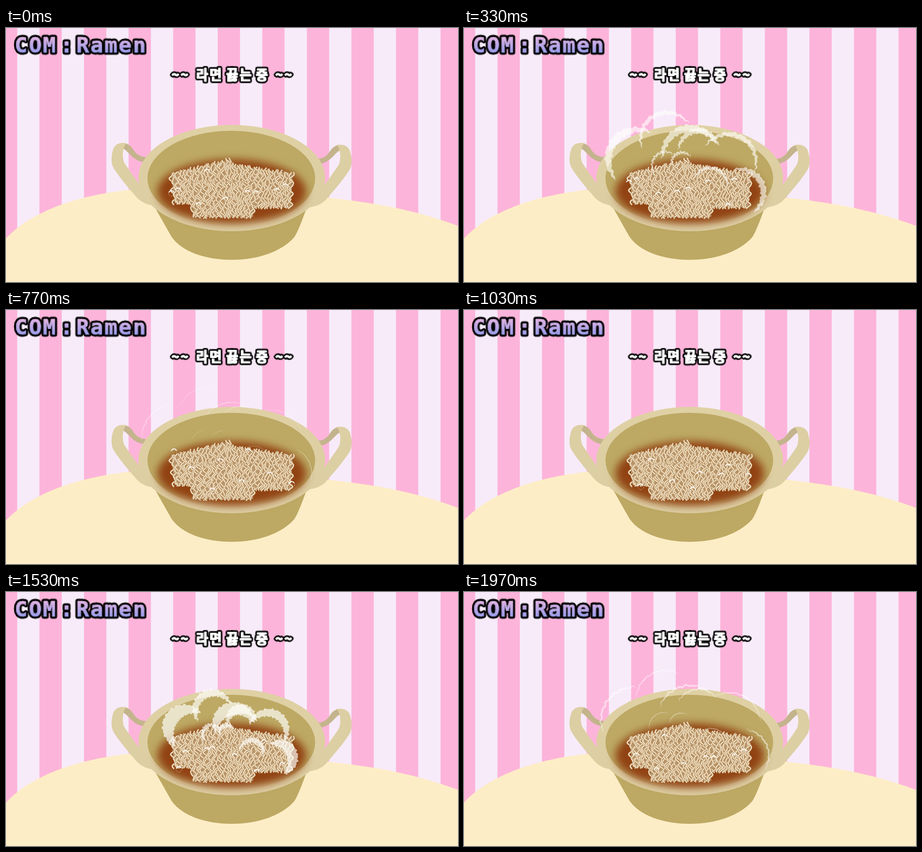
Recreate the animation shown at these times as an HTML page with a canvas. Size 997 by 561 pixels, loop 2010 ms.

```html
<!DOCTYPE html>
<html lang="ko">
<head>
<meta charset="utf-8">
<style>
html, body { margin: 0; width: 100%; height: 100%; overflow: hidden; }
canvas { display: block; }
</style>
</head>
<body>
<canvas id="stage" width="997" height="561"></canvas>
<script>
const W = 997, H = 561, LOOP = 2010, STEAM = 1375, TAU = Math.PI * 2, RAD = Math.PI / 180;
const OLIVE = '#bda964', RIM = '#dccda2';
const ctx = document.getElementById('stage').getContext('2d');

let seed = 7;
const rnd = () => (seed = seed * 16807 % 2147483647) / 2147483647;
const mix = (a, b, k) => a + (b - a) * k;

function layer(w, h) {
  const c = document.createElement('canvas');
  c.width = w;
  c.height = h;
  return c;
}

function fillPath(g, color, d) {
  g.fillStyle = color;
  g.fill(new Path2D(d));
}

function ellipse(g, color, x, y, rx, ry) {
  g.fillStyle = color;
  g.beginPath();
  g.ellipse(x, y, rx, ry, 0, 0, TAU);
  g.fill();
}

function fade(g, y0, color0, y1, color1) {
  const grad = g.createLinearGradient(0, y0, 0, y1);
  grad.addColorStop(0, color0);
  grad.addColorStop(1, color1);
  return grad;
}

function drawHandle(g) {
  fillPath(g, '#c4b48d', 'M256 254 Q271 254 279 266 Q290 285 309 285 L302 296 Q287 294 273 279 Q262 267 256 265Z');
  fillPath(g, '#dccfa3', 'M268 255 Q245 250 237 266 Q229 290 236 307 C247 327 277 361 290 376 ' +
    'Q303 389 325 392 L330 365 L297 350 C282 327 268 310 260 296 Q254 275 263 257Z');
}

// A slab of wavy strands, its top edge sloping from y0 to y1
function drawNoodles(g, x0, y0, x1, y1, bottom) {
  fillPath(g, '#b9956a', `M${x0} ${y0}L${x1} ${y1}L${x1 - 4} ${bottom}L${x0 + 8} ${bottom}Z`);
  g.lineCap = g.lineJoin = 'round';
  const count = Math.round((x1 - x0) / 3.8);
  for (let i = 0; i <= count; i++) {
    const u = i / count, phase = rnd() * 4, freq = .2 + rnd() * .12, amp = 2.5 + rnd() * 2;
    const top = mix(y0, y1, u) - rnd() * 4, end = bottom + rnd() * 4;
    g.beginPath();
    for (let y = top; y <= end; y += 1.5) {
      const lean = mix(8, -6, u) * (y - top) / (end - top);
      g.lineTo(mix(x0, x1, u) + lean + amp * Math.sin(y * freq + phase) + Math.sin(y * .5 + phase), y);
    }
    for (const [color, width] of [['#a57f52', 3.8], ['#e2c9a2', 2.7], ['#f8ebd3', 1.3]]) {
      g.strokeStyle = color;
      g.lineWidth = width;
      g.stroke();
    }
  }
}

// Words drawn at half size and doubled, for blocky edges
function pixelText(g, words, font, y, color, outline, weight) {
  const c = layer(W / 2 | 0, 64), t = c.getContext('2d');
  t.scale(.5, .5);
  t.font = font;
  t.letterSpacing = '3px';
  t.textAlign = 'center';
  t.lineJoin = 'round';
  t.fillStyle = color;
  for (const [stroke, width] of [['#000', outline], [color, weight]]) {
    t.strokeStyle = stroke;
    t.lineWidth = width;
    for (const [word, x] of words) t.strokeText(word, x, y);
  }
  for (const [word, x] of words) t.fillText(word, x, y);
  g.imageSmoothingEnabled = false;
  g.drawImage(c, 0, 0, c.width * 2, c.height * 2);
}

function drawScene(g) {
  g.fillStyle = '#f7ebfa';
  g.fillRect(0, 0, W, H);
  g.fillStyle = '#fdb4da';
  for (let x = -24.5; x < W; x += 98.3) g.fillRect(x, 0, 49.2, H);
  fillPath(g, '#fdedc6', 'M0 465 C60 400 170 368 275 357 C430 335 600 352 720 376 C850 390 930 412 997 437 V561 H0Z');

  fillPath(g, OLIVE, 'M326 392 L365 461 C388 494 440 512 497 512 C556 512 607 494 635 463 Q644 452 665 392Z');
  drawHandle(g);
  g.save();
  g.translate(995, 4);
  g.scale(-1, 1);
  drawHandle(g);
  g.restore();

  ellipse(g, fade(g, 214, '#dfd1a4', 449, RIM), 498, 331.5, 206, 117.5);
  ellipse(g, fade(g, 390, OLIVE, 438, RIM), 497, 332, 185, 105);
  g.filter = 'blur(9px)';
  ellipse(g, '#914213', 498, 361, 164, 71);
  g.filter = 'none';

  drawNoodles(g, 364, 323, 493, 291, 387);
  drawNoodles(g, 489, 301, 632, 322, 396);
  drawNoodles(g, 405, 343, 549, 342, 417);

  pixelText(g, [['COM', 66], [':', 135], ['Ramen', 233]], 'bold 47px "DejaVu Sans Mono", monospace',
    54, fade(g, 18, '#e5b4e2', 56, '#969ceb'), 10, 1);
  pixelText(g, [['~~', 385], ['라면', 449], ['끓는', 515], ['중', 566], ['~~', 614]],
    '900 29px "Noto Sans CJK KR", "Noto Sans CJK", sans-serif', 113, '#fff', 9, 2);
}

// Final centre and radius of each puff; all spread out from one source
const source = [530, 400];
const puffs = [
  [372, 281, 73], [443, 236, 65], [497, 272, 69], [587, 288, 68], [617, 360, 58],
  [440, 298, 33], [517, 262, 50], [544, 342, 42], [478, 292, 26]
];

// Each puff swells quickly, then thins into a vanishing crescent
function drawSteam(p) {
  if (p < 20 || p > 840) return;
  const swell = Math.max(-2.8, 1 - Math.exp((200 - p) / 130));
  const thin = Math.exp((200 - p) / 185);
  const half = Math.min(165, 100 - (p - 200) * .1) * RAD;
  ctx.fillStyle = `rgba(255,255,252,${mix(.74, .4, p / 840)})`;
  puffs.forEach(([endX, endY, endR], n) => {
    const near = .1 * (1 - swell);
    const x = mix(endX, source[0], near), y = mix(endY, source[1], near);
    const r = endR * mix(.75, 1, swell);
    const thick = Math.min(1.5, (n % 2 ? .32 : .52) * thin) * r;
    const face = Math.atan2(endY - source[1], endX - source[0]);
    const ragged = a => Math.min(1.2, thick * .25) * (Math.sin(a * 19 + n) + Math.sin(a * 31 + n * 2));
    const edge = (s, depth) => {
      const a = face + half * s, d = r - depth + ragged(a);
      ctx.lineTo(x + d * Math.cos(a), y + d * Math.sin(a));
    };
    ctx.beginPath();
    for (let s = -1; s <= 1; s += .03) edge(s, 0);
    for (let s = 1; s >= -1; s -= .03) edge(s, thick * (1 - s * s) ** .7);
    ctx.fill();
  });
}

const bubbles = Array.from({ length: 18 }, (_, i) => ({
  x: 365 + (i * 7 % 18) * 15.5,
  y: 365 + rnd() * 50,
  born: i / 18 * LOOP,
  sway: rnd() * 14 - 7
}));

function drawBubble(x, y, fresh) {
  ctx.strokeStyle = '#fff';
  ctx.lineWidth = 2;
  ctx.beginPath();
  ctx.arc(x, y, 6, 195 * RAD, 335 * RAD);
  ctx.stroke();
  ctx.lineWidth = 1;
  ctx.setLineDash([1.5, 2.5]);
  ctx.beginPath();
  ctx.arc(x, y, 6.5, -25 * RAD, (fresh ? 195 : 30) * RAD);
  ctx.stroke();
  ctx.setLineDash([]);
}

function drawBubbles(t) {
  for (const b of bubbles) {
    const age = (t - b.born + LOOP) % LOOP;
    if (age < 900) drawBubble(b.x + b.sway * Math.sin(age * TAU / 640), b.y - age * .068, age < 150);
  }
}

const scene = layer(W, H);
drawScene(scene.getContext('2d'));

function frame(now) {
  const t = Math.floor((now % LOOP + 10) / 33.4) * 33.4 % LOOP;
  ctx.drawImage(scene, 0, 0);
  drawSteam(t % STEAM);
  drawBubbles(t);
  requestAnimationFrame(frame);
}
requestAnimationFrame(frame);
</script>
</body>
</html>
```
